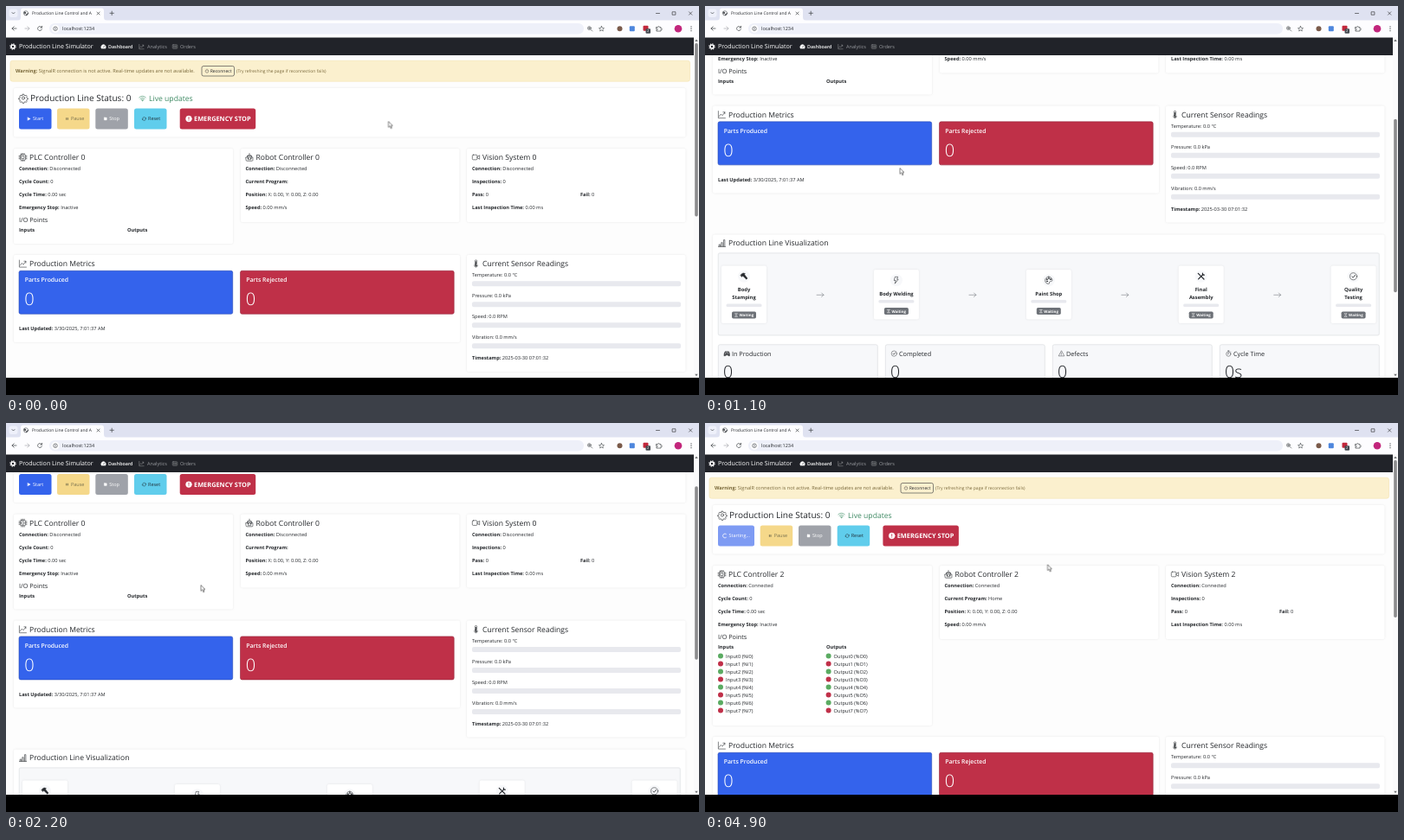
Recreate the animation shown at these times as an HTML page. Size 800 by 450 pixels, loop 5000 ms.

```html
<!DOCTYPE html>
<html lang="en">
<head>
<meta charset="utf-8">
<title>Production Line Simulator</title>
<style>
@property --scroll { syntax: "<number>"; inherits: true; initial-value: 0; }
@property --go { syntax: "<number>"; inherits: true; initial-value: 0; }
@property --live { syntax: "<number>"; inherits: true; initial-value: 0; }
@property --tick { syntax: "<number>"; inherits: true; initial-value: 0; }

html, body { margin: 0; width: 100%; height: 100%; overflow: hidden; background: #000; }
svg { display: block; }
#stage {
  animation: scroll 5s linear infinite, go 5s step-end infinite,
    live 5s step-end infinite, tick 5s step-end infinite;
}
@keyframes scroll {
  0%, 14% { --scroll: 0; }
  18% { --scroll: 104.5; }
  28% { --scroll: 273.5; }
  32% { --scroll: 346; }
  34%, 36% { --scroll: 355; }
  38% { --scroll: 322; }
  42% { --scroll: 120; }
  46%, 100% { --scroll: 0; }
}
@keyframes go { 0% { --go: 0; } 54%, 100% { --go: 1; } }
@keyframes live { 0% { --live: 0; } 94%, 100% { --live: 1; } }
@keyframes tick { 0% { --tick: 0; } 52%, 100% { --tick: 1; } }

.page { transform: translateY(calc(var(--scroll) * -1px)); }
.thumb { transform: translateY(calc(var(--scroll) * .509px)); }
.lower { transform: translateY(calc(var(--live) * 75px)); }
.after { transform: translateX(calc(var(--go) * 4.7px)); }
.go1 { opacity: var(--go); }
.go0 { opacity: calc(1 - var(--go)); }
.live1 { opacity: var(--live); }
.live0 { opacity: calc(1 - var(--live)); }
.tick1 { opacity: var(--tick); }
.tick0 { opacity: calc(1 - var(--tick)); }

.spin { transform-origin: 23px 130.5px; animation: spin 5s linear infinite; }
@keyframes spin { from { transform: rotate(-192deg); } to { transform: rotate(2208deg); } }

.cursor { animation: move 5s ease-in-out infinite; }
@keyframes move {
  0%, 3% { transform: translate(441.5px, 133.5px); }
  12%, 46% { transform: translate(225px, 187.5px); }
  53%, 62% { transform: translate(34px, 124.5px); }
  73%, 100% { transform: translate(395.5px, 163.7px); }
}

text { font-family: "Open Sans", "Noto Sans", sans-serif; fill: #25282c; text-rendering: geometricPrecision; }
.b { font-weight: 700; }
.card { fill: #fff; filter: drop-shadow(0 .8px .8px rgba(0, 0, 0, .09)); }
.ic { fill: none; stroke: currentColor; stroke-linecap: round; stroke-linejoin: round; }
.ic .f { fill: currentColor; }
</style>
</head>
<body>
<svg id="stage" width="800" height="450" viewBox="0 0 800 450"></svg>
<script>
// Icons live in a 16 x 16 box and are drawn with a one-unit line.
const icons = {
  gear: '<circle cx="8" cy="8" r="2.6"/><path d="M6.8 1h2.4l.5 2 1.6.7 1.8-1 1.7 1.8-1 1.7.7 1.6 2 .5v2l-2 .6-.7 1.5 1 1.8-1.7 1.6-1.8-1-1.6.7-.5 2H6.8l-.6-2-1.5-.7-1.8 1-1.7-1.6 1-1.8-.7-1.5-2-.6v-2l2-.5.7-1.6-1-1.7 1.7-1.8 1.8 1 1.5-.7z"/>',
  cog: '<circle cx="8" cy="8" r="4.3" stroke-width="3.6"/><circle cx="8" cy="8" r="6.8" stroke-width="2.2" stroke-dasharray="2.6 2.74" stroke-linecap="butt"/>',
  speed: '<path class="f" d="M2 13a7 7 0 1 1 12 0z"/><path d="M8 9.5 11 6" stroke="#212329" stroke-width="1.4"/>',
  graph: '<path d="M.7 1v14.3H15M2.5 11.5 6 7l3 3 5-6.5M10.5 3H14v3.5"/>',
  list: '<rect x=".7" y="2" width="14.6" height="12" rx="2"/><path d="M3.5 5.5h1M7 5.5h5.5M3.5 8h1M7 8h5.5M3.5 10.5h1M7 10.5h5.5"/>',
  wifi: '<path d="M1 6q7-6 14 0M3.2 8.7q4.8-4 9.6 0M5.5 11.2q2.5-2 5 0" stroke-width="1.3"/><circle class="f" cx="8" cy="13.4" r=".7"/>',
  play: '<path class="f" d="M4 3l9 5-9 5z"/>',
  pause: '<path d="M5.5 4v8M10.5 4v8" stroke-width="3" stroke-linecap="butt"/>',
  stop: '<rect class="f" x="3.5" y="3.5" width="9" height="9" rx="1"/>',
  reset: '<path d="M2 7a6.2 6.2 0 0 1 11.4-2.3M14 9A6.2 6.2 0 0 1 2.6 11.3M11.3 7h4L13.6 4.5M4.7 9h-4l1.7 2.5" stroke-width="1.4"/>',
  alert: '<circle class="f" cx="8" cy="8" r="7.3"/><path d="M8 4v4.6M8 11.4v.2" stroke="#c0304a" stroke-width="1.8"/>',
  power: '<path d="M4 3.5a6 6 0 1 0 8 0M8 1v5" stroke-width="1.4"/>',
  cpu: '<rect x="2.5" y="2.5" width="11" height="11" rx="2"/><rect x="5.5" y="5.5" width="5" height="5"/><path d="M5 0v2M8 0v2M11 0v2M5 14v2M8 14v2M11 14v2M0 5h2M0 8h2M0 11h2M14 5h2M14 8h2M14 11h2"/>',
  robot: '<path d="M8 0v2.5M3 8a5 5 0 0 1 10 0M1 8h14v6a1.5 1.5 0 0 1-1.5 1.5h-11A1.5 1.5 0 0 1 1 14zM5 12.8h6M3.5 5.5h9"/><circle class="f" cx="5.2" cy="10" r=".8"/><circle class="f" cx="10.8" cy="10" r=".8"/>',
  video: '<rect x=".6" y="3" width="10" height="10" rx="2"/><path d="M10.6 7 15.4 4v8l-4.8-3"/>',
  thermo: '<path d="M6 9.5V2.5a2 2 0 0 1 4 0v7a3.2 3.2 0 1 1-4 0z"/><path d="M8 4v8" stroke-width="1.6"/><circle class="f" cx="8" cy="12.3" r="1.2"/>',
  bars: '<path d="M.7 15.3h14.6M2 15v-4h2.5v4M6.7 15V7h2.5v8M11.5 15V1.5H14V15"/>',
  hammer: '<path class="f" d="M1 5.2 4.5 2q3-1.6 6 .6L8.8 4.2 15 12l-2 2-7.3-7-2 1.7z"/>',
  bolt: '<path d="M6 1h5L9.2 6H12L5 15l1.8-6.5H4z"/>',
  palette: '<path d="M8 .7a7.3 7.3 0 1 0 0 14.6c2 0 1-2.3 1.3-3.5.6-2 6-.4 6-3.8A7.3 7.3 0 0 0 8 .7z"/><circle class="f" cx="8" cy="4" r="1"/><circle class="f" cx="4.3" cy="6" r="1"/><circle class="f" cx="11.7" cy="6" r="1"/><circle class="f" cx="4.8" cy="10" r="1"/>',
  tools: '<path d="M2 2l11.5 11.5M10 10l3.8 3.8" stroke-width="2.2"/><path d="M2.5 13.5 12 4M11 1.5l.3 3.2 3.2.3" stroke-width="2"/>',
  check: '<circle cx="8" cy="8" r="7.2"/><path d="M4.8 8.2 7.2 10.6 11.3 5.4" stroke-width="1.4"/>',
  car: '<path class="f" d="M1 8 3 3h10l2 5v6h-3v-2H4v2H1z"/><path d="M4 7l.8-2.5h6.4L12 7zM4 9.5h1M11 9.5h1" stroke="#f7f8fa"/>',
  warn: '<path d="M8 1.2.8 14.4h14.4zM8 6v4M8 12v.2"/>',
  watch: '<circle cx="8" cy="9.2" r="6"/><path d="M6.2.7h3.6M8 .7V3M8 6v3.2H5.4M13 3l1 1"/>',
  glass: '<path d="M3 1.5h10M3 14.5h10M4.5 1.5c0 4 2 4.500 3 6.500-1 2-3 2.500-3 6.500M11.500 1.500c0 4-2 4.500-3 6.500 1 2 3 2.500 3 6.500" stroke-width="1.6"/>',
  arrow: '<path d="M1 8h14M11 4l4 4-4 4"/>',
  globe: '<circle cx="8" cy="8" r="7"/><path class="f" d="M3 4q5 0 5 3t-4 3zM9 14q0-5 5-5-1 4-5 5z"/>',
  star: '<path d="M8 1.500l2 4.500 4.800.5-3.600 3.200 1 4.800L8 12l-4.200 2.500 1-4.800L1.200 6.500 6 6z"/>',
  zoom: '<circle cx="6.500" cy="6.500" r="4.800"/><path d="M10.200 10.200 15 15M4.500 6.500h4M6.500 4.500v4"/>',
  puzzle: '<path d="M2 4.500h4a2 2 0 1 1 4 0h3.500v4a2 2 0 1 1 0 3V15H2v-3.500a2 2 0 1 0 0-3z"/>'
};

const ink = '#25282c', blue = '#3463ec', red = '#bf3048', grey = '#6d7177';
const icon = (name, x, y, size, color = ink, line = 1) =>
  `<g class="ic" color="${color}" stroke-width="${line}" transform="translate(${x - size / 2} ${y - size / 2}) scale(${size / 16})">${icons[name]}</g>`;
const text = (x, y, str, size = 5.67, attr = '') =>
  `<text x="${x}" y="${y}" dy=".35em" font-size="${size}" ${attr}>${str}</text>`;
const box = (x, y, w, h, fill, r = 0, attr = '') =>
  `<rect x="${x}" y="${y}" width="${w}" height="${h}" rx="${r}" fill="${fill}" ${attr}/>`;
const card = (x, y, w, h, cls = '') => `<rect class="card ${cls}" x="${x}" y="${y}" width="${w}" height="${h}" rx="2"/>`;
const line = (d, color = '#3c4043', w = .7) =>
  `<path d="${d}" fill="none" stroke="${color}" stroke-width="${w}" stroke-linecap="round" stroke-linejoin="round"/>`;
const group = (cls, ...parts) => `<g class="${cls}">${parts.join('')}</g>`;
const head = (name, x, y, str) => icon(name, x + 4.5, y, 9) + text(x + 12, y, str, 8.6, 'font-weight="500"');
const pair = (x, y, key, val = '') => text(x, y, `<tspan class="b">${key}:</tspan> ${val}`);
const swap = (state, off, on) => group(state + '0', off) + group(state + '1', on);
const middle = 'text-anchor="middle"';

function browser() {
  const dark = '#3c4043';
  return box(0, 0, 800, 20, '#dfe2f1') + box(0, 16.5, 800, 20, '#fdfdff') +
    box(3.5, 3.5, 10, 9.5, '#eef0fa', 3) + line('M7 7.500l1.500 1.500 1.500-1.500') +
    '<path d="M13 17q4 0 4-4V5.500q0-3 3-3h90q3 0 3 3V13q0 4 4 4z" fill="#fdfdff"/>' +
    icon('globe', 23, 8.3, 6, dark, 1.4) + text(30, 8.3, 'Production Line Control and A', 4.95) +
    line('M105 7l3 3M108 7l-3 3M120 8.300h4.400M122.200 6.100v4.400') +
    line('M750.500 8.500h4M769.500 6.800h3.400v3.400h-3.400zM788.500 6.800l3.400 3.400M791.900 6.800l-3.400 3.400', '#222', .6) +
    line('M12 26H7m2.200-2.200L7 26l2.200 2.200') + line('M22 26h5m-2.200-2.200L27 26l-2.200 2.200', '#a9abb0') +
    line('M41.300 24.800a2.500 2.500 0 1 0 .2 2M41.500 23.300v1.700h-1.700') +
    box(50, 20, 617, 12.500, '#eef0f9', 6.2) + '<circle cx="57" cy="26.200" r="4.500" fill="#fdfdff"/>' +
    '<circle cx="57" cy="26.200" r="2.300" fill="none" stroke="#3c4043" stroke-width=".6"/>' +
    line('M57 26v1.200M57 25v.1', dark, .6) + text(65, 26.2, 'localhost:1234', 5.5) +
    icon('zoom', 674, 26.2, 6.5, dark, 1.4) + icon('star', 687.5, 26.2, 7, dark, 1.3) +
    '<circle cx="708.500" cy="26.200" r="3" fill="#7a5a4a"/>' + box(719.8, 23.2, 6, 6, '#4d86dd', 1) +
    box(735.5, 22.8, 6, 6, '#c2283c', 1) + box(738.500, 26.2, 5.500, 5.500, '#444950', 1) +
    text(741.2, 29, '2', 4, middle + ' style="fill:#fff"') + icon('puzzle', 753.5, 26, 7, dark, 1.5) +
    '<circle cx="776" cy="26.200" r="4.300" fill="#c2267c"/>' + line('M791 23.800v.1M791 26.200v.1M791 28.600v.1', dark, 1.2);
}

function navbar() {
  const dim = '#9b9da1', white = 'style="fill:#fff"', soft = `style="fill:${dim}"`;
  return box(0, 36.5, 794, 20.5, '#212329') + icon('cog', 8, 47, 7.5, '#fff') +
    text(15, 47, 'Production Line Simulator', 7.08, white) +
    icon('speed', 112.5, 47, 6.5, '#fff') + text(118, 47, 'Dashboard', 5.4, 'font-weight="600" ' + white) +
    icon('graph', 156.500, 47, 6, dim, 1.3) + text(163, 47, 'Analytics', 5.55, soft) +
    icon('list', 195, 47, 6, dim, 1.3) + text(201, 47, 'Orders', 5.55, soft);
}

function button(x, w, name, label, fill, color) {
  return box(x, 118.5, w, 24, fill, 2.5) + icon(name, x + 11.5, 130.5, 5.2, color, 1.2) +
    text(x + 16, 130.5, label, 5.5, `style="fill:${color}"`);
}

function status() {
  const brown = 'style="fill:#79683a"';
  const ring = '<path class="spin" d="M24.700 132.200a2.400 2.400 0 1 1 0-3.400" fill="none" stroke="#fff" stroke-width=".8"/>';
  return box(5, 63.2, 784.5, 24, '#fbf0ce', 2.5, 'stroke="#f3e2af" stroke-width=".6"') +
    text(11, 75.2, '<tspan class="b">Warning:</tspan> SignalR connection is not active. Real-time updates are not available.', 5.67, brown) +
    box(226, 69.5, 37.5, 11.5, '#fbf0ce', 2, 'stroke="#33363a" stroke-width=".6"') +
    icon('power', 232, 75.300, 5, ink, 1.2) + text(235.7, 75.3, 'Reconnect', 5.1) +
    text(266, 75.3, '(Try refreshing the page if reconnection fails)', 5, brown) +
    card(9, 95, 775.5, 56.5) + icon('gear', 20, 106.5, 10) +
    text(28, 106.5, 'Production Line Status: 0', 10.05, 'font-weight="500"') +
    icon('wifi', 157.5, 106.8, 8.5, '#4f9a74') +
    text(165, 106.7, 'Live updates', 8.65, 'font-weight="500" style="fill:#3f8a64"') +
    swap('go', button(15, 37.5, 'play', 'Start', blue, '#fff'),
      box(15, 118.5, 42, 24, '#7e9bf3', 2.5) + ring + text(27.5, 130.5, 'Starting...', 5.5, 'style="fill:#fff"')) +
    group('after',
      button(59, 37.5, 'pause', 'Pause', '#f5d88a', '#77704f'), button(103.3, 37.5, 'stop', 'Stop', '#9fa2a9', '#fff'),
      button(148, 37.5, 'reset', 'Reset', '#60cdec', '#22333c'), box(200.7, 118.5, 87.5, 24, red, 2.5),
      icon('alert', 211, 130.5, 7.5, '#fff'), text(217, 130.5, 'EMERGENCY STOP', 7.4, 'class="b" style="fill:#fff"'));
}

function points() {
  let out = '';
  for (let i = 0; i < 8; i++) {
    const y = 270 + i * 9, fill = i % 2 ? '#c03049' : '#5bab62';
    for (const [x, name, k] of [[18, 'Input', 'I'], [142.6, 'Output', 'O']])
      out += `<circle cx="${x}" cy="${y - .5}" r="3" fill="${fill}"/>` + text(x + 6, y, `${name}${i} (%${k}${i})`);
  }
  return out;
}

function devices() {
  const title = (name, x, str) => swap('live', head(name, x, 175, str + ' 0'), head(name, x, 175, str + ' 2')) +
    swap('live', pair(x, 188, 'Connection', 'Disconnected'), pair(x, 188, 'Connection', 'Connected'));
  return card(9, 165, 253, 110, 'live0') + card(9, 165, 253, 185, 'live1') +
    card(271, 165, 252.5, 85) + card(532, 165, 252.5, 85) +
    title('cpu', 15, 'PLC Controller') + title('robot', 276.5, 'Robot Controller') + title('video', 538, 'Vision System') +
    pair(15, 203, 'Cycle Count', '0') + pair(15, 218, 'Cycle Time', '0.00 sec') + pair(15, 233, 'Emergency Stop', 'Inactive') +
    text(15, 247.7, 'I/O Points', 7.25, 'font-weight="500"') + text(15, 259, 'Inputs', 5.67, 'class="b"') +
    text(140, 259, 'Outputs', 5.67, 'class="b"') + group('live1', points()) +
    swap('live', pair(276.5, 203, 'Current Program'), pair(276.5, 203, 'Current Program', 'Home')) +
    pair(276.5, 218, 'Position', 'X: 0.00, Y: 0.00, Z: 0.00') + pair(276.5, 233, 'Speed', '0.00 mm/s') +
    pair(538, 203, 'Inspections', '0') + pair(538, 218, 'Pass', '0') + pair(663, 218, 'Fail', '0') +
    pair(538, 233, 'Last Inspection Time', '0.00 ms');
}

function metrics() {
  const tile = (x, label, fill, edge) => box(x, 306.3, 246.7, 50, fill, 2, `stroke="${edge}" stroke-width=".6"`) +
    text(x + 6.7, 317, label, 6.85, 'font-weight="600" style="fill:#fff"') +
    text(x + 6.2, 339, '0', 20, 'font-weight="300" style="fill:#fff"');
  const readings = ['Temperature: 0.0 °C', 'Pressure: 0.0 kPa', 'Speed: 0.0 RPM', 'Vibration: 0.0 mm/s'];
  return card(9, 288, 515, 101) + card(532, 288, 252.5, 135) +
    head('graph', 15, 298, 'Production Metrics') +
    tile(15, 'Parts Produced', blue, '#2749b4') + tile(270.5, 'Parts Rejected', red, '#94243a') +
    swap('tick', pair(15, 373, 'Last Updated', '3/30/2025, 7:01:37 AM'), pair(15, 373, 'Last Updated', '3/30/2025, 7:01:42 AM')) +
    head('thermo', 538, 298, 'Current Sensor Readings') +
    readings.map((s, i) => text(538, 311 + i * 24, s) + box(538, 318.3 + i * 24, 241, 6, '#e8e9ee', 2)).join('') +
    pair(538, 407, 'Timestamp', '2025-03-30 07:01:32');
}

const stages = [
  ['hammer', 'Body Stamping', 'Stamping metal sheets into body panels'],
  ['bolt', 'Body Welding', 'Joining body panels with robotic welding'],
  ['palette', 'Paint Shop', 'Applying base coat, color, and clear coat'],
  ['tools', 'Final Assembly', 'Installing components and finishing'],
  ['check', 'Quality Testing', 'Final inspection and testing']
];

function flow() {
  return stages.map(([name, label], i) => {
    const x = 45 + i * 175.9, two = i % 4 === 0 || i === 3, d = two ? 4.5 : 0;
    const bold = middle + ' class="b"';
    const words = two ? label.split(' ').map((w, n) => text(x, 500.5 + n * 9, w, 5.8, bold)).join('') : text(x, 505, label, 5.8, bold);
    return card(x - 26, 477.5 - d, 52, 57.5 + 2 * d) +
      `<circle cx="${x}" cy="${489.7 - d}" r="7" fill="#f7f8fa"/>` + icon(name, x, 489.7 - d, 9) + words +
      box(x - 20.5, 512.5 + d, 41, 3.5, '#e8e9ee', 1.5) + box(x - 14, 521.5 + d, 28, 8, grey, 1.7) +
      icon('glass', x - 9, 525.5 + d, 4.3, '#fff', 1.5) + text(x - 5.5, 525.5 + d, 'Waiting', 4.35, 'class="b" style="fill:#fff"') +
      (i < 4 ? icon('arrow', x + 88, 506.7, 9, '#6c7076') : '');
  }).join('');
}

function line2() {
  const edge = 'stroke="#d5d7da" stroke-width=".6"';
  const stats = [['car', 'In Production', '0'], ['check', 'Completed', '0'], ['warn', 'Defects', '0'], ['watch', 'Cycle Time', '0s']];
  return card(9, 437, 775.5, 328) + head('bars', 15, 446.7, 'Production Line Visualization') +
    box(15.3, 458.3, 763, 95, '#f7f8fa', 2, 'stroke="#e9ebed" stroke-width="1.2"') + flow() +
    stats.map(([name, label, n], i) => {
      const x = 15 + i * 193;
      return box(x + .3, 564.2, 184, 49.3, '#f7f8fa', 2, edge) + icon(name, x + 10.3, 574.5, 7) +
        text(x + 16, 574.5, label, 7.25, 'font-weight="500"') + text(x + 6, 595.7, n, 19.500, 'font-weight="300"');
    }).join('') +
    stages.map(([name, label, note], i) => {
      const x = 15 + i % 3 * 257.5, y = 620.2 + (i > 2 ? 71.6 : 0);
      return box(x + .3, y, 248.5, 65, '#fff', 2, edge) + box(x + .3, y, 248.5, 15, '#f7f8fa', 2, edge) +
        icon(name, x + 10, y + 7.5, 7.5) + text(x + 16.5, y + 7.5, label, 7.3, 'font-weight="500"') +
        text(x + 6.3, y + 26, note, 5.67, 'style="fill:#3b3e42"') + box(x + 6.3, y + 36.3, 236, 7.3, '#e8e9ee', 2) +
        pair(x + 6.3, y + 54.3, 'Status') + box(x + 27, y + 50.3, 15.5, 8, grey, 1.7) +
        text(x + 34.8, y + 54.3, 'IDLE', 4.4, middle + ' class="b" style="fill:#fff"');
    }).join('');
}

const thumb = (h, cls) => box(795.2, 43, 3.6, h, '#8b8b8d', 1.8, `class="${cls}"`);

document.getElementById('stage').innerHTML =
  '<clipPath id="view"><path d="M0 57h794v373H0z"/></clipPath>' +
  box(0, 0, 800, 450, '#000') + box(0, 36, 800, 394, '#fdfdfd') +
  `<g clip-path="url(#view)">${group('page', status(), devices(), group('lower', metrics(), line2()))}</g>` +
  browser() + navbar() + box(794, 36.5, 6, 393.5, '#fafafb') +
  group('thumb', thumb(200.5, 'live0'), thumb(182, 'live1')) +
  '<path d="M795.200 41l1.800-2.400 1.800 2.400zM795.200 425.800l1.800 2.400 1.800-2.400z" fill="#707274"/>' +
  '<path class="cursor" d="M0 0v6.800l1.600-1.400 1.200 2.700 1.200-.5-1.200-2.600h2.100z" fill="#fff" stroke="#333" stroke-width=".6" stroke-linejoin="round"/>';
</script>
</body>
</html>
```
